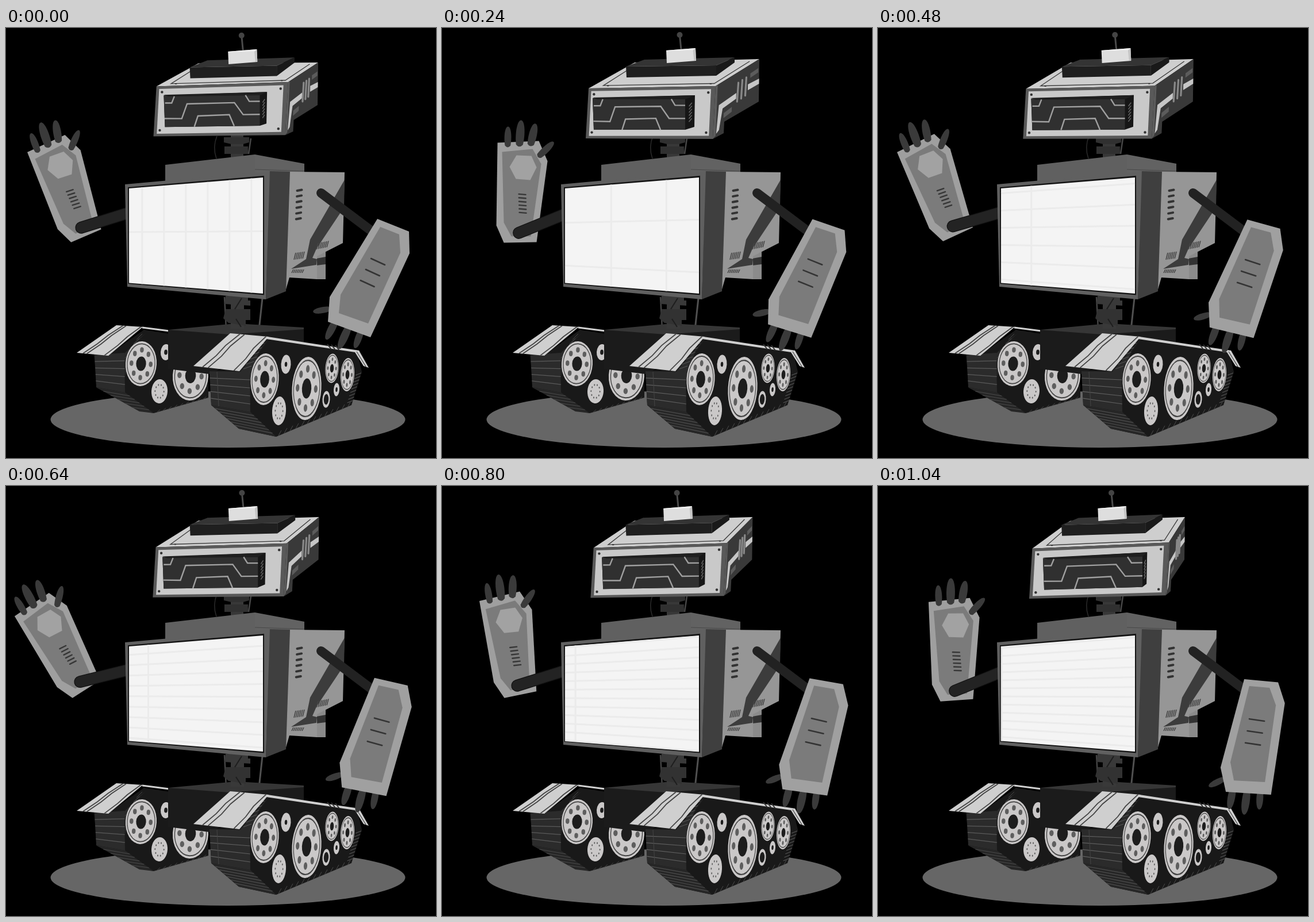
An HTML page with a canvas that plays this animation: 748 by 748 pixels, repeating every 1.08 s.

```html
<!DOCTYPE html>
<html lang="en">
<head>
<meta charset="utf-8">
<title>Waving robot</title>
<style>
html, body { margin: 0; width: 100%; height: 100%; overflow: hidden; background: #000; }
canvas { display: block; width: 748px; height: 748px; }
</style>
</head>
<body>
<canvas id="stage" width="748" height="748"></canvas>
<script>
const ctx = document.getElementById('stage').getContext('2d');
const LOOP = 1080, STEP = 40, LAST = LOOP - STEP, TURN = Math.PI * 2;

const mix = (a, b, k) => a + (b - a) * k;
const clamp = x => Math.min(1, Math.max(0, x));
const smooth = x => x * x * (3 - 2 * x);

// every moving value follows from the time alone
function pose(t) {
  const lift = clamp(1 - t / 240) ** 2;
  const bob = Math.cos((t - 620) / 800 * TURN);
  const fromPeak = Math.abs((t + 125) % 720 - 360) / 360;
  return {
    lift,
    yaw: lift / 2 + clamp((t - 360) / 680),
    elbowX: 131.2 - 2.4 * bob,
    elbowY: 348.5 - 8 * bob,
    wave: -33.5 * smooth(fromPeak ** 1.15),
    drop: -16.4 * (t / LAST) ** 1.22,
    colW: 38 + 0.3 * t - 14 * Math.sin(t / 960 * TURN),
    rowH: 14 + 94 * Math.exp(-((t / 360) ** 2))
  };
}

function trace(p) {
  ctx.beginPath();
  for (let i = 0; i < p.length; i += 2) ctx.lineTo(p[i], p[i + 1]);
}
function poly(color, ...p) {
  trace(p);
  ctx.closePath();
  ctx.fillStyle = color;
  ctx.fill();
}
function line(color, width, ...p) {
  trace(p);
  ctx.strokeStyle = color;
  ctx.lineWidth = width;
  ctx.stroke();
}
function oval(color, x, y, rx, ry = rx) {
  ctx.beginPath();
  ctx.ellipse(x, y, rx, ry, 0, 0, TURN);
  ctx.fillStyle = color;
  ctx.fill();
}
function dash(color, width, ...p) {
  ctx.lineCap = 'round';
  line(color, width, ...p);
  ctx.lineCap = 'butt';
}
// evenly repeated strokes
function repeat(n, color, width, p, dx, dy, stroke = line) {
  for (let i = 0; i < n; i++)
    stroke(color, width, p[0] + dx * i, p[1] + dy * i, p[2] + dx * i, p[3] + dy * i);
}
// maps unit coordinates into a quad given as TL, TR, BR, BL
function place(q, uv) {
  const out = [];
  for (let i = 0; i < uv.length; i += 2)
    for (const k of [0, 1])
      out.push(mix(mix(q[k], q[2 + k], uv[i]), mix(q[6 + k], q[4 + k], uv[i]), uv[i + 1]));
  return out;
}
function spin(x, y, deg, px, py, draw) {
  ctx.save();
  ctx.translate(x, y);
  ctx.rotate(deg * Math.PI / 180);
  ctx.translate(-px, -py);
  draw();
  ctx.restore();
}

function wheel(x, y, rx, ry, hub = 0.32, holes = 8, dot = 0.12, orbit = 0.62) {
  ctx.save();
  ctx.translate(x, y);
  ctx.rotate(0.06);
  ctx.scale(rx, ry);
  oval('#cac8c8', 0, 0, 1);
  if (holes === 8) {
    ctx.beginPath();
    ctx.arc(0, 0, 0.89, 0, TURN);
    ctx.strokeStyle = '#444';
    ctx.lineWidth = 0.045;
    ctx.stroke();
  }
  oval('#1d1d1d', 0, 0, hub);
  for (let i = 0; i < holes; i++) {
    const a = i / holes * TURN;
    oval('#5e5e5e', Math.cos(a) * orbit, Math.sin(a) * orbit, dot);
  }
  ctx.restore();
}
const cap = (x, y, rx, ry) => wheel(x, y, rx, ry, 0, 10, 0.075, 0.55);
const nut = (x, y, rx, ry, hub) => wheel(x, y, rx, ry, hub, 0);

function finger(x, y, deg, len, w) {
  spin(x, y, deg, 0, 0, () => {
    ctx.beginPath();
    ctx.moveTo(-w * 0.8, len * 0.85);
    ctx.bezierCurveTo(-w * 1.25, 0, -w * 0.9, -len, 0, -len);
    ctx.bezierCurveTo(w * 0.9, -len, w * 1.25, 0, w * 0.8, len * 0.85);
    ctx.quadraticCurveTo(0, len * 1.15, -w * 0.8, len * 0.85);
    ctx.fillStyle = '#3a3a3a';
    ctx.fill();
  });
}

function tread(quad, n, fill, rib) {
  poly(fill, ...quad);
  for (let i = 1; i < n; i++) line(rib, 1.2, ...place(quad, [0, i / n, 1, i / n]));
}
function fender(...quad) {
  poly('#cfcfcf', ...quad);
  for (const u of [0.2, 0.32, 0.88])
    line('#444', 1.8, ...place(quad, [u + 0.05, 0, u, 0.35, u + 0.03, 0.65, u, 1]));
}

function leftTrack() {
  poly('#191919', 153, 566, 190, 560, 240, 525, 284, 532, 352, 590, 352, 643, 257, 670, 232, 665, 158, 626);
  poly('#2b2b2b', 206, 566, 243, 531, 222, 548, 207, 606);
  tread([154, 569, 206, 565, 207, 634, 157, 625], 5, '#2b2b2b', '#5a5a5a');
  tread([157, 625, 207, 634, 257, 670, 232, 667], 6, '#262626', '#4a4a4a');
  repeat(5, '#474747', 1, [207, 574, 217, 564], 5, -8);
  repeat(9, '#444', 1, [262, 669, 268, 664], 10, -2.8);
  wheel(235, 584, 27, 39);
  nut(278, 564, 9, 14, 0.32);
  wheel(321, 605, 31, 43, 0.3);
  cap(267, 632, 14, 21);
  fender(192, 517, 238, 520, 178, 570, 123, 565);
  line('#cfcfcf', 3, 237, 521, 284, 527);
}

function rightTrack() {
  poly('#191919', 354, 597, 400, 592, 455, 540, 610, 560, 619, 598, 601, 656, 470, 711, 405, 697, 357, 656);
  poly('#2b2b2b', 408, 597, 457, 541, 440, 564, 425, 614);
  tread([354, 597, 424, 598, 425, 668, 357, 656], 5, '#2b2b2b', '#606060');
  tread([357, 656, 425, 668, 470, 711, 405, 697], 7, '#262626', '#4c4c4c');
  line('#454545', 1, 367, 598, 370, 658);
  repeat(6, '#555', 1.2, [413, 593, 427, 588], 4.5, -8);
  repeat(13, '#4a4a4a', 1, [474, 709, 479, 700], 10, -4.1);
  repeat(9, '#555', 1.2, [618, 600, 608, 604], -1.8, 6);
  wheel(450, 611, 24.5, 45);
  wheel(523, 627, 25.5, 55);
  nut(487, 585, 8.5, 16.5, 0.26);
  cap(475, 666, 12, 25);
  wheel(567, 592, 11.5, 25.5, 0.28);
  wheel(594, 603, 12, 29, 0.28);
  nut(557, 646, 6.5, 14.5, 0.64);
  nut(575, 629, 5, 11.5, 0.35);
  fender(390, 531, 457, 537, 406, 597, 326, 588);
  poly('#cfcfcf', 455, 537, 560, 553, 614, 561, 631, 591, 622, 588, 607, 564, 560, 557, 453, 541);
  repeat(3, '#333', 2, [559, 550, 566, 559], 7, 1);
  line('#444', 1.2, 610, 563, 626, 589);
}

function chassis() {
  line('#444', 2.5, 380, 468, 383, 524);
  line('#505050', 3, 446, 470, 440, 525);
  poly('#1b1b1b', 282, 525, 518, 521, 518, 548, 420, 570, 354, 602, 282, 593);
  poly('#363636', 282, 525, 400, 514, 518, 521, 518, 524, 388, 533);
  poly('#393939', 391, 464, 414, 464, 414, 523, 391, 523);
  poly('#393939', 382, 466, 421, 466, 421, 474, 425, 474, 425, 483, 380, 480);
  poly('#323232', 382, 489, 425, 489, 425, 508, 417, 508, 417, 518, 387, 513, 378, 505);
  line('#1e1e1e', 2, 398, 489, 410, 470);
  line('#1e1e1e', 2, 400, 506, 409, 520);
}

function leftArm(x, y, deg) {
  spin(x, y, deg, 133, 354, () => {
    poly('#9f9f9f', 96, 197, 168, 194, 183, 229, 164, 370, 107, 371, 94, 341);
    poly('#7b7b7b', 104, 213, 157, 208, 172, 234, 154, 360, 120, 360, 107, 336);
    poly('#a2a2a2', 129, 219, 155, 220, 164, 240, 153, 262, 128, 260, 117, 239);
    repeat(6, '#363636', 2.4, [133, 286.5, 145, 287.5], 0.2, 6.4, dash);
    finger(114, 187, 1, 18, 6);
    finger(135.5, 181, 4, 23, 7.5);
    finger(157.5, 183.5, 13, 20, 7);
    finger(180, 209, 46, 19, 6);
  });
  dash('#111', 21, x, y, 240, 313);
  dash('#232323', 18.5, x, y, 240, 313);
}

function neck() {
  ctx.beginPath();
  ctx.moveTo(367, 188);
  ctx.quadraticCurveTo(359, 207, 366, 227);
  ctx.strokeStyle = '#2c2c2c';
  ctx.lineWidth = 1.5;
  ctx.stroke();
  poly('#383838', 391, 180, 413, 180, 413, 228, 391, 228);
  poly('#303030', 379, 190, 423, 190, 423, 199, 412, 202, 392, 202, 379, 199);
  poly('#303030', 380, 206, 421, 206, 421, 219, 380, 219);
  line('#464646', 2.5, 426, 192, 422, 219);
  poly('#606060', 277, 238, 433, 220, 433, 252, 277, 268);
  poly('#626262', 433, 220, 519, 236, 519, 252, 433, 252);
  line('#484848', 1, 433, 246, 519, 249);
}

function head(yaw, lift) {
  // near parts slide right with the yaw, far parts slide left; the front rises with the lift
  const move = (pts, slide, widen, rise, tilt = 0) => pts.map((v, i) => {
    const x = pts[i - i % 2] - 250;
    return i % 2 ? v + yaw * tilt * (4 - 0.03 * x) + lift * rise : v + yaw * (slide + widen * x);
  });
  const face = move([255, 105, 476, 101, 471, 193, 250, 192], 13, 0.075, -5.5, 1);
  const visor = move([262, 122, 423, 124, 423, 177, 264, 177], 24, 0.075, -6.5, 1);
  const edge = move([440, 117, 439, 172], 14, 0.075, -5, 1);
  const far = move([552, 54, 551, 128], -18, 0, 6);
  const notch = move([491, 163, 490, 183], 19, 0, -3);
  const slab = move([320, 67, 352, 55, 509, 51, 477, 65], 4, -0.07, 1, 0.4);
  const cube = move([390, 39, 441, 35, 442, 57, 391, 61], -3, -0.033, 2);
  const rod = move([416, 38, 413.5, 12], -7.5, 0, 1);

  const [flx, fly, frx, fry, fbx, fby] = face;
  const side = [frx, fry, ...far, fbx, fby];
  const lid = [slab[0] + 15, slab[1] - 7, far[0], far[1], frx, fry, flx, fly];
  const onFace = (...uv) => place(face, uv);
  const onSide = (...uv) => place(side, uv);
  const slot = (u, v) => poly('#5c5c5c', ...onSide(u, v, u + 0.18, v, u + 0.18, v + 0.1, u, v + 0.1));

  // lid
  poly('#cecece', ...lid);
  line('#3b3b3b', 1.3, ...place(lid, [0.05, 0.2, 0.08, 0.9, 0.955, 0.9, 0.95, 0.08]));
  for (const u of [0.12, 0.93]) oval('#333', ...place(lid, [u, 0.91]), 2, 1);

  // side
  poly('#393939', frx, fry, ...far, ...notch, fbx, fby);
  poly('#c6c6c6', ...onSide(0.1, 0.42, 0.49, 0.42, 0.49, 0.54, 0.19, 0.54, 0.13, 0.92, 0.07, 0.95));
  poly('#c6c6c6', ...onSide(0.75, 0.41, 1, 0.46, 1, 0.58, 0.75, 0.54));
  for (const u of [0.53, 0.62, 0.71]) dash('#888', 3.2, ...onSide(u, 0.23, u - 0.015, 0.62));
  slot(0.8, 0.2);
  slot(0.22, 0.65);
  poly('#5c5c5c', ...onSide(0, 0, 0.05, 0.01, 0.06, 0.98, 0, 1));

  // front
  poly('#595959', ...face);
  poly('#c9c9c9', ...onFace(0.022, 0.055, 0.965, 0.055, 0.968, 0.94, 0.024, 0.95));
  for (const v of [0.12, 0.88])
    for (const u of [0.045, 0.945]) oval('#333', ...onFace(u, v), 2.2);

  // visor
  const [vx, vy, wx, wy, ...low] = visor;
  poly('#161616', vx, vy, ...edge, ...low);
  poly('#303030', ...visor);
  poly('#1f1f1f', vx, vy - 1, edge[0], edge[1], wx, wy, vx + 8, vy + 2);
  const circuit = (...uv) => line('#a0a0a0', 2.4, ...place(visor, uv));
  circuit(0.01, 0.24, 0.08, 0.24, 0.11, 0.03);
  circuit(0, 0.73, 0.18, 0.74, 0.24, 0.27, 0.735, 0.24, 0.825, 0.63, 1, 0.63);
  circuit(0.31, 1, 0.35, 0.66, 0.68, 0.63, 0.73, 1);
  circuit(0.85, 0, 0.89, 0.2, 1, 0.2);
  const cheek = [wx, wy, ...edge, low[0], low[1]];
  for (let v = 0.24; v < 0.8; v += 0.1)
    line('#666', 1.5, ...place(cheek, [0.4, v + 0.04, 0.7, v - 0.04]));

  // top unit
  const [ax, ay, , , cx, cy, dx, dy] = slab;
  poly('#343434', ...slab);
  poly('#1f1f1f', ax, ay, dx, dy, dx, dy + 18, ax + 1, ay + 19);
  poly('#191919', dx, dy, cx, cy, cx, cy + 9, dx, dy + 18);
  line('#4a4a4a', 3, ...rod);
  oval('#444', rod[2], rod[3], 5);
  poly('#dedede', ...cube);
  poly('#c4c4c4', ...place(cube, [0.91, 0.16, 1, 0, 1, 0.92, 0.93, 1]));
  poly('#ececec', ...place(cube, [0, 0, 1, 0, 0.91, 0.15, 0.02, 0.06]));
}

function screen(colW, rowH) {
  const quad = [214, 279, 447, 260, 447, 462, 214, 443.5];
  poly('#131313', 212, 277, 449, 257, 449, 464.5, 212.5, 445);
  poly('#f4f4f4', ...quad);
  const rule = (...uv) => line('#ebebeb', 3, ...place(quad, uv));
  // lines spread from a fixed point of the pane
  for (let n = -4; n < 14; n++) {
    const u = (111 + colW * (n - 0.32)) / 233;
    const v = (24 + rowH * (n + 0.48)) / 164;
    if (u === clamp(u)) rule(u, 0, u, 1);
    if (v === clamp(v)) rule(0, v, 1, v);
  }
}

function body() {
  poly('#8b8b8b', 540, 390, 556, 385, 556, 437, 541, 437);
  poly('#333', 540, 401, 556, 398, 556, 411, 540, 413);
  poly('#969696', 492, 250, 589, 251, 586, 374, 541, 397, 541, 437, 493, 434, 486, 458);
  poly('#3c3c3c', 589, 264, 529, 368, 522, 402, 496, 419, 540, 412, 541, 402, 533, 400, 540, 384, 588, 312);
  repeat(6, '#333', 4, [506.5, 283, 514.5, 281.5], -0.35, 9.9, dash);
  repeat(6, '#444', 1.6, [501, 403, 504, 391], 3, -0.4);
  repeat(7, '#444', 1.6, [540, 385, 543, 374], 3, -0.6);
  repeat(7, '#444', 1.6, [497, 426, 500, 420], 3, 0);
  poly('#3f3f3f', 458, 249, 494, 250, 487, 458, 452, 472);
  poly('#606060', 207, 272, 459, 249, 452, 472, 211, 450);
}

function rightArm(deg) {
  dash('#222', 16, 548, 287, 645, 360);
  spin(655, 365, deg, 655, 365, () => {
    finger(549, 491, 260, 15, 5.5);
    finger(566, 524, 207, 20, 6.5);
    finger(588, 538, 204, 22, 7);
    finger(613, 540, 200, 18, 6);
    poly('#a0a0a0', 646, 332, 701, 354, 702, 392, 634, 538, 560, 511, 563, 468);
    poly('#7b7b7b', 651, 346, 684, 359, 686, 391, 630, 514, 579, 496, 582, 464);
    repeat(3, '#343434', 2.6, [635, 401, 659, 412], -9.2, 19, dash);
  });
}

function draw(t) {
  const p = pose(t);
  ctx.fillStyle = '#000';
  ctx.fillRect(0, 0, 748, 748);
  oval('#666', 386, 681, 308.5, 49);
  leftTrack();
  chassis();
  rightTrack();
  leftArm(p.elbowX, p.elbowY, p.wave);
  neck();
  head(p.yaw, p.lift);
  body();
  screen(p.colW, p.rowH);
  rightArm(p.drop);
}

const start = performance.now();
let shown = -1;
function tick() {
  const time = (performance.now() - start) % LOOP;
  // the opening pose is held for two steps
  const step = time < 2 * STEP ? 0 : Math.floor(time / STEP);
  if (step !== shown) draw((shown = step) * STEP);
  requestAnimationFrame(tick);
}
tick();
</script>
</body>
</html>
```
